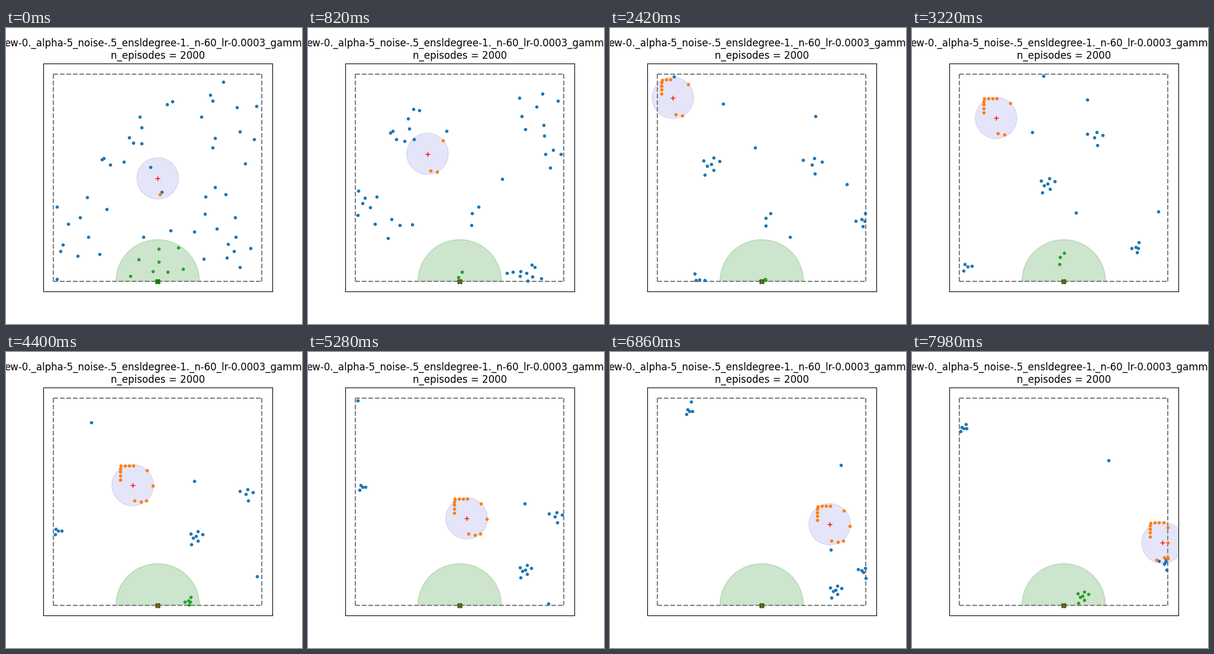
Animation, 500 px wide and 500 px high, one loop 8 s. Source, as a matplotlib script:

```python
import numpy as np
import matplotlib.pyplot as plt
from matplotlib.animation import FuncAnimation
from matplotlib.patches import Ellipse, Wedge
from matplotlib.transforms import Affine2D

N = 400                                   # frames, 20 ms each
SPEED = 1.76                              # pixels per frame
KEYS = [0, 83, 161, 220, 264, 343, 399]   # frames at which routes turn
EXIT = np.array([256.25, 427.5])
LOW, HIGH = np.array([80.1, 77.5]), np.array([432.4, 427.5])
T = np.arange(N)
rng = np.random.default_rng(4)

# leader waypoints: frame, x, y
ROUTE = np.array([
    (0, 256.2, 254), (83, 146, 170), (126, 101, 111), (161, 142, 152),
    (220, 214, 225), (264, 268, 281), (303, 319, 329), (343, 371, 291),
    (369, 404, 308), (390, 416, 307), (399, 423, 322)])

# size, first and last spread, centre at each key; short routes end in the exit
SHOALS = [
    (10, 60, 10, [(258, 395)]),
    (9, 55, 12, [(375, 365), (312, 405)]),
    (3, 40, 15, [(337, 285), (230, 265), (250, 387)]),
    (5, 70, 8, [(395, 175), (415, 260), (378, 370), (308, 420)]),
    (4, 55, 7, [(121, 385), (192, 384), (94, 403), (88, 302), (92, 228),
                (134, 100), (87, 129)]),
    (7, 60, 13, [(125, 320), (110, 250), (229, 263), (321, 311), (367, 368),
                 (381, 402), (288, 412)]),
    (5, 75, 14, [(330, 150), (345, 175), (308, 185), (405, 240), (417, 278),
                 (428, 372), (426, 358)]),
    (1, 0, 0, [(272, 129), (246, 116), (222, 81), (144, 119), (84, 82),
               (137, 84), (91, 122)]),
    (1, 0, 0, [(367, 91), (348, 92), (296, 121), (318, 218), (366, 256),
               (390, 191), (332, 183)])]


def polar(r, angle):
    return np.stack([r * np.cos(angle), r * np.sin(angle)], axis=-1)


def fold(p):
    """Reflect a free path at the walls."""
    span = HIGH - LOW
    return LOW + span - np.abs(span - (p - LOW) % (2 * span))


def leader(t):
    return np.stack([np.interp(t, ROUTE[:, 0], ROUTE[:, i]) for i in (1, 2)],
                    axis=-1)


def curve(points):
    """Arcs between key points, as long as the speed asks for."""
    pts = np.array(points, float)
    path = np.tile(pts[-1], (N, 1))
    for k in range(len(pts) - 1):
        n = KEYS[k + 1] - KEYS[k]
        u = np.arange(n)[:, None] / n
        d = pts[k + 1] - pts[k]
        dist = np.hypot(*d)
        slack = np.sqrt(max((SPEED * n) ** 2 - dist ** 2, 0))
        side = np.array([d[1], -d[0]]) / dist
        path[KEYS[k]:KEYS[k + 1]] = (
            pts[k] + d * u + side * 0.4 * slack * np.sin(np.pi * u))
    return path


def shoal(size, wide, tight, points):
    k = np.arange(size)
    place = polar(np.sqrt(k / size), 2.4 * k + rng.uniform(0, 6.3))
    place *= rng.uniform(0.8, 1.2, (size, 1))
    spread = tight + (wide - tight) * np.exp(-T / 60)
    fish = fold(curve(points)[:, None] + spread[:, None, None] * place)
    if len(points) < len(KEYS):
        start = KEYS[len(points) - 1]
        d = EXIT - fish[start]
        u = (T[start:, None] - start) * SPEED / np.linalg.norm(d, axis=1)
        u = u[..., None]
        fish[start:] = np.where(u < 1, fish[start] + d * u, np.nan)
    return fish


# places around the leader, squeezed while it passed the top left corner
rim = np.radians(np.linspace(209, 299, 9) % 90 + 187)
rim = np.clip(polar(38, np.sort(rim)), (-21, -33), None)
SLOTS = np.vstack([[(3, 26), (14, 28), (24, -25)], rim,
                   [(34, 1), (23, 26), (-10, 30)]])
JOIN = np.interp(np.arange(len(SLOTS)), [0, 4, 11, 13, 14],
                 [0, 80, 126, 220, 350])


def follower(slot, join):
    """Swim straight to the leader, then keep the place beside it."""
    meet = leader(join) + slot
    heading = polar(0.7 * SPEED, np.radians(217) + rng.uniform(-0.6, 0.6))
    swim = fold(meet + heading * (T - join)[:, None])
    kept = np.clip(leader(np.maximum(T - 1, 0)) + slot + 1, LOW, HIGH)
    return np.where((T < join)[:, None], swim, kept)


LEADER = leader(T)
caught = [follower(s, j) for s, j in zip(SLOTS, JOIN)]
FISH = np.concatenate([shoal(*s) for s in SHOALS]
                      + [np.stack(caught, axis=1)], axis=1)
FIRST_OUT = np.isnan(FISH[..., 0]).any(axis=1).argmax()

held = np.zeros(FISH.shape[:2], bool)
held[:, -len(SLOTS):] = T[:, None] >= JOIN
near = (np.linalg.norm(FISH - EXIT, axis=2) < 71) & ~held
GROUPS = [("C0", ~held & ~near), ("C1", held), ("C2", near)]

fig = plt.figure(figsize=(5, 5), dpi=100)
ax = fig.add_subplot()
ax.set(xlim=(62.5, 450), ylim=(445, 60), xticks=[], yticks=[])
ax.set_title("ew-0._alpha-5_noise-.5_ensldegree-1._n-60_lr-0.0003_gamma-\n"
             "n_episodes = 2000")

(x0, y0), (x1, y1) = LOW, HIGH
for xs, ys in [((x0, x1), (y1, y1)), ((x0, x1), (y0, y0)),
               ((x0, x0), (y1, y0)), ((x1, x1), (y1, y0))]:
    ax.plot(xs, ys, "--", color="gray", lw=1.5)
to_stage = Affine2D().scale(*(HIGH - LOW) / 2).translate(*EXIT)
ax.add_patch(Wedge((0, 0), 0.4, 180, 360, color="g", alpha=0.2,
                   transform=to_stage + ax.transData))
zone = ax.add_patch(Ellipse(LEADER[0], 70.4, 70, color="mediumblue",
                            alpha=0.1))
dots = [ax.plot([], [], ".", color=c, ms=6)[0] for c, _ in GROUPS]
ax.plot(*EXIT, "X", color="g", ms=6)
out, = ax.plot(*EXIT, ".", color="C3", ms=6)
plus, = ax.plot([], [], "r+", ms=6)


def draw(i):
    for dot, (_, mask) in zip(dots, GROUPS):
        dot.set_data(*FISH[i, mask[i]].T)
    zone.center = LEADER[i]
    plus.set_data(*LEADER[i][:, None])
    out.set_visible(bool(i >= FIRST_OUT))
    return [*dots, zone, plus, out]


anim = FuncAnimation(fig, draw, frames=N, interval=20, repeat=True,
                     repeat_delay=0)
plt.show()
```
